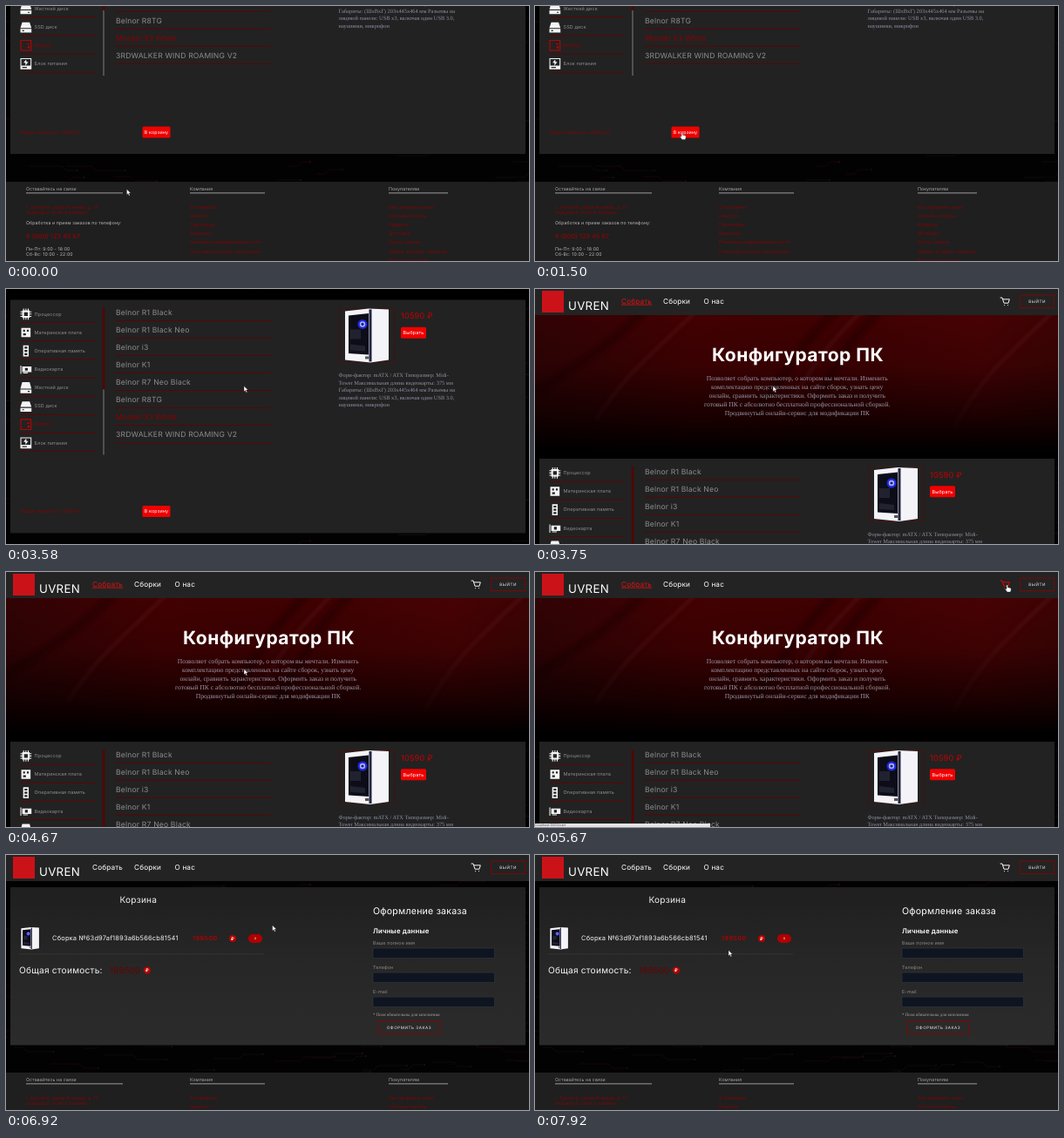
These frames come from a looping animation (600x293 px, 8000 ms). An HTML page:

```html
<!DOCTYPE html>
<html lang="ru">
<head>
<meta charset="utf-8">
<title>Конфигуратор ПК</title>
<style>
html, body { margin: 0; height: 100%; overflow: hidden; background: #000; }
svg { display: block; width: 100vw; height: 100vh; }
text { font-family: Inter, sans-serif; text-rendering: geometricPrecision; white-space: pre; }
.serif { font-family: "Liberation Serif", serif; }
</style>
</head>
<body>
<svg id="stage" viewBox="0 0 600 293"></svg>
<script>
const LOOP = 8000, FPS = 12;
const RED = '#e60000', DEEP = '#8c0000', LINE = '#640000', PANEL = '#222';

// Drawing helpers: y of a text is the middle of its lower-case letters
const text = (x, y, s, size, fill, extra = '') =>
  `<text x="${x}" y="${y + size * .33}" font-size="${size}" letter-spacing="${size * .02}" fill="${fill}" ${extra}>${s}</text>`;
const serif = (x, y, s, size, fill, extra = '') =>
  `<text class="serif" x="${x}" y="${y + size * .3}" font-size="${size}" fill="${fill}" ${extra}>${s}</text>`;
const rect = (x, y, w, h, fill, extra = '') =>
  `<rect x="${x}" y="${y}" width="${w}" height="${h}" fill="${fill}" ${extra}/>`;
const path = (d, fill, extra = '') => `<path d="${d}" fill="${fill}" ${extra}/>`;
const circle = (x, y, r, fill) => `<circle cx="${x}" cy="${y}" r="${r}" fill="${fill}"/>`;
const at = (x, y, body, scale = 1) => `<g transform="translate(${x} ${y}) scale(${scale})">${body}</g>`;
const middle = 'text-anchor="middle"';
const outline = (x, y, w, h, label) => rect(x, y, w, h, 'none', `stroke="#8e0000" stroke-width=".8"`) +
  text(x + w / 2, y + h / 2, label, 4.6, '#eee', `${middle} style="letter-spacing:.55px"`);
const button = (x, y, w, h, label, size) => rect(x, y, w, h, '#f00000', 'rx="1.5"') +
  text(x + w / 2, y + h / 2, label, size, '#fff', middle);
const rouble = (x, y) => circle(x, y, 4, '#b80000') + text(x, y, '₽', 5, '#fff', `${middle} font-weight="700"`);

// Faint circuit-board traces
function circuit(height) {
  let seed = 7, out = '';
  const rnd = n => (seed = seed * 16807 % 2147483647) % n;
  for (let i = 0; i < 150; i++) {
    const x = rnd(620) - 20, y = rnd(height), a = 8 + rnd(30), k = rnd(2) ? 5 : -5, b = 8 + rnd(30);
    out += path(`M${x} ${y}h${a}l5 ${k}h${b}`, 'none', `stroke="${i % 3 ? '#131010' : '#220709'}" stroke-width=".7"`) +
      circle(x + a + b + 5, y + k, 1, i % 5 ? '#141212' : '#33080a');
  }
  return rect(0, 0, 600, height, '#020202') + out;
}

function header(active) {
  const nav = [[99, 'Собрать'], [147, 'Сборки'], [193.5, 'О нас']];
  return rect(0, 0, 600, 30, '#232323') + rect(8, 2, 25, 25, '#cc1219') +
    text(38, 19.2, 'UVREN', 13.3, '#fff') +
    nav.map(([x, s], i) => text(x, 14, s, 8.2, i === active ? '#e01010' : '#fff',
      i === active ? 'text-decoration="underline"' : '')).join('') +
    path('M534 10h2l2 6.2h5l1.3-4.4h-7.5M538.5 18.6h.1M542.5 18.6h.1', 'none',
      'stroke="var(--trolley)" stroke-linecap="round" stroke-linejoin="round"') +
    outline(556.5, 7, 39.2, 14.5, 'ВЫЙТИ');
}

function hero() {
  const cables = [[0, 120, 130], [70, 150, 190], [255, 140, 350], [280, 150, 380], [310, 150, 400], [480, 160, 600]];
  return rect(0, 30, 600, 165, 'url(#heroBase)') +
    '<g filter="url(#soft)">' + cables.map(([x, y, end], i) =>
      path(`M${x} ${y}C${x + 40} 90 ${end - 60} 80 ${end} 20`, 'none',
        `stroke="${i % 2 ? '#6e2426' : '#120102'}" stroke-width="${i % 2 ? 5 : 9}" opacity=".35"`)).join('') + '</g>' +
    rect(0, 30, 600, 166, 'url(#heroShade)') +
    text(301.5, 76, 'Конфигуратор ПК', 21.1, '#fff', `${middle} font-weight="700"`) +
    ['Позволяет собрать компьютер, о котором вы мечтали. Изменить',
     'комплектацию представленных на сайте сборок, узнать цену',
     'онлайн, сравнить характеристики. Оформить заказ и получить',
     'готовый ПК с абсолютно бесплатной профессиональной сборкой.',
     'Продвинутый онлайн-сервис для модификации ПК']
      .map((s, i) => serif(300.7, 103 + i * 10, s, 7.62, '#9a98a8', middle)).join('');
}

const tower = path('M1 3L28 0L51 1V59L30 62L1 59Z', '#f4f4f8') + path('M5 8L28 5.5V53L5 51.5Z', '#0c0d18') +
  path('M28.5 1L31.5 1V61H28.5Z', '#23263f') +
  path('M7 24h12v11H7zM7 41l17 2v6L7 48z', '#20222f') +
  circle(21, 18, 5.5, '#2028e0') + circle(21, 18, 3.2, '#aab0ff') + circle(21, 18, 1.6, '#1a1d80') +
  rect(24, 55, 4.5, 3, '#555');

// Part icons on a 12 x 12 grid
const icons = [
  'M2 2h8v8H2zM4 4v4h4V4zM3 0h1v2H3zM5.5 0h1v2h-1zM8 0h1v2H8zM3 10h1v2H3zM5.5 10h1v2h-1zM8 10h1v2H8zM0 3h2v1H0zM0 5.5h2v1H0zM0 8h2v1H0zM10 3h2v1h-2zM10 5.5h2v1h-2zM10 8h2v1h-2z',
  'M1 1h10v10H1zM3 3v2h2V3zM7 3v2h2V3zM3 7v2h3V7z',
  'M3 0h6v12H3zM4.5 1.5v2h3v-2zM4.5 5v2h3V5zM4.5 8.5v2h3v-2z',
  'M0 2h1v9H0zM2 3h10v6H2zM5 4.5v3h3v-3zM3 9.5h5v1H3z',
  'M2 0h8l2 7H0zM0 8h12v4H0zM8 9.5v1h2v-1z',
  'M2 1h8l2 6H0zM0 8h12v4H0zM2 9.5v1h2v-1z',
  'M0 0h12v12H0zM1 1v10h10V1zM7 4h3v1H7zM8 7h2v2H8z',
  'M0 0h12v12H0zM1 1v7h10V1zM2 9.5v1h5v-1zM5.5 2h1v2h2l-3 4V5h-2z'];
const parts = ['Процессор', 'Материнская плата', 'Оперативная память', 'Видеокарта',
  'Жесткий диск', 'SSD диск', 'Корпус', 'Блок питания'];
const cases = ['Belnor R1 Black', 'Belnor R1 Black Neo', 'Belnor i3', 'Belnor K1',
  'Belnor R7 Neo Black', 'Belnor R8TG', 'Mordel X3 White', '3RDWALKER WIND ROAMING V2'];

function configurator() {
  const partList = parts.map((s, i) => {
    const y = 211.3 + i * 21.15, chosen = i === 6;
    return at(16.5, y - 6.3, path(icons[i], chosen ? '#c00000' : '#f4f4f4', 'fill-rule="evenodd"'), 1.06) +
      text(32.5, y, s, 5.5, chosen ? DEEP : '#8c8c8c') + rect(17, y + 9.4, 86, .8, LINE);
  }).join('');
  const caseList = cases.map((s, i) => {
    const y = 210.2 + i * 20;
    return text(126, y, s, 8.6, i === 6 ? DEEP : '#8c8c8c') + rect(126, y + 8.6, 178, .8, LINE);
  }).join('');
  const details = ['Форм-фактор: mATX / ATX Типоразмер: Midi-', 'Tower Максимальная длина видеокарты: 375 мм',
    'Габариты: (ШхВхГ) 203x445x464 мм Разъемы на', 'лицевой панели: USB x3, включая один USB 3.0,', 'наушники, микрофон'];
  return rect(5, 195, 591, 268, PANEL) + partList + caseList +
    rect(110.8, 204, 2.4, 94, '#560000') + rect(111, 298, 2, 75, '#505050') +
    rect(383, 205.5, 63, 61, 'none', 'stroke="#5a0808" stroke-width=".6"') + at(388, 205, tower) +
    text(453, 214, '10590 ₽', 9.2, '#c40000') + button(453, 226.3, 29, 13, 'Выбрать', 5.5) +
    details.map((s, i) => serif(381.5, 282 + i * 8.4, s, 6.4, '#8f8fa6')).join('') +
    text(16, 438, 'Общая стоимость: 199500 ₽', 4.9, DEEP) + button(156.5, 431.5, 32, 13, 'В корзину', 5.4);
}

function footer(top) {
  const column = (x, width, title, items) => text(x, top + 8.7, title, 5.2, '#aaa') + rect(x, top + 12.5, width, .8, '#bbb') +
    items.map((s, i) => text(x, top + 29 + i * 10.2, s, 5.1, DEEP)).join('');
  return rect(0, top, 600, 95, '#1f1f1f') +
    column(23, 111, 'Оставайтесь на связи', []) +
    text(23, top + 29, 'г. Луговой, улица Ясенева, д. 12', 5.1, DEEP) +
    text(23, top + 35, 'подъезд 2, этаж 3, кабинет', 5.1, DEEP) +
    text(23, top + 47, 'Обработка и прием заказов по телефону:', 5.2, '#bbb') +
    text(23, top + 63, '8 (000) 123 45 67', 7.1, '#a00000') +
    text(23, top + 77, 'Пн-Пт: 9:00 - 18:00', 5.2, '#bbb') + text(23, top + 83.3, 'Сб-Вс: 10:00 - 22:00', 5.2, '#bbb') +
    column(211, 86, 'Компания', ['О компании', 'Новости', 'Партнёрам', 'Вакансии',
      'Политика конфиденциальности', 'Пользовательское соглашение']) +
    column(439, 68, 'Покупателям', ['Как оформить заказ', 'Способы оплаты', 'Кредиты', 'Доставка',
      'Статус заказа', 'Обмен, возврат, гарантия', 'Вопросы и ответы']);
}

function basket() {
  const fields = ['Ваше полное имя', 'Телефон', 'E-mail'].map((s, i) =>
    text(421, 101 + i * 28, s, 5.4, '#8a8a8a') +
    rect(421, 107 + i * 28, 139.5, 11.5, '#0f1520', 'stroke="#30343c" stroke-width=".7"')).join('');
  const row = at(17, 83, tower, .41) + text(53, 96, 'Сборка №63d97af1893a6b566cb81541', 7.5, '#f2f2f2') +
    text(214, 96, '199500', 7.1, '#b00000', 'font-weight="600" style="letter-spacing:.5px"') + rouble(260, 96) +
    rect(278, 91, 16, 10, '#b00000', 'rx="5"') + text(286, 96, 'x', 4.5, '#fff', middle) +
    rect(15, 113.5, 281, .7, '#3c3c3c');
  const total = (y, sum, x) => text(15, y, 'Общая стоимость:', 10.2, '#f2f2f2') +
    text(119, y, sum, 9.8, '#6a0000') + rouble(x, y - .3);
  return rect(5, 37, 591, 181.5, 'url(#basketPanel)') + text(130.5, 52, 'Корзина', 10.1, '#f2f2f2') +
    `<g id="empty">${total(89.7, '0', 133)}</g><g id="filled">${row + total(132.7, '199500', 162)}</g>` +
    text(421, 64.3, 'Оформление заказа', 10.6, '#fff') +
    text(421, 87, 'Личные данные', 7.8, '#fff', 'font-weight="600"') + fields +
    serif(421, 183.7, '* Поля обязательны для заполнения', 5, '#aaa') + outline(427, 190.5, 71, 15, 'ОФОРМИТЬ ЗАКАЗ');
}

const stops = list => list.map(([o, c, a = 1]) => `<stop offset="${o}" stop-color="${c}" stop-opacity="${a}"/>`).join('');
const stage = document.getElementById('stage');
stage.innerHTML = `<defs>
  <linearGradient id="heroBase">${stops([[0, '#380406'], [.3, '#4c0203'], [.6, '#480203'], [.85, '#520305'], [1, '#460405']])}</linearGradient>
  <linearGradient id="heroShade" x2="0" y2="1">${stops([[0, '#000', .12], [.35, '#000', .25], [.7, '#000', .65], [.95, '#000']])}</linearGradient>
  <linearGradient id="basketPanel" x2="0" y2="1">${stops([[0, '#1f1f1f'], [.5, '#272727'], [1, '#2b2b2b']])}</linearGradient>
  <filter id="soft"><feGaussianBlur stdDeviation="2"/></filter></defs>
  <g id="build">${circuit(590) + hero() + header(0) + configurator() + footer(495)}</g>
  <g id="cart">${circuit(293) + header(-1) + basket() + footer(250)}</g>
  <g id="status">${rect(0, 289, 201, 4, '#e4e4e4') + text(.5, 291, 'localhost:3000/cart', 3.6, '#444')}</g>
  <g id="pointer">
    ${path('M0 0V6.4L1.5 5L2.6 7.4L3.7 6.9L2.6 4.6H4.6Z', '#fff', 'id="arrow" stroke="#222" stroke-width=".4"')}
    ${path('M0 .7Q.8-.3 1.5.7V3.2L5 4Q5.6 6 4.4 8.5H.7L-1.6 5.2Q-1.4 4.2 0 5Z', '#fff', 'id="hand" stroke="#222" stroke-width=".4"')}
  </g>`;

const part = id => document.getElementById(id);
const show = (id, on) => part(id).setAttribute('visibility', on ? 'visible' : 'hidden');
const move = (id, x, y) => part(id).setAttribute('transform', `translate(${x} ${y})`);

// Each key is [time, ...values]
function track(keys, t, ease = u => u) {
  const i = keys.findIndex(k => k[0] > t);
  if (i < 0) return keys.at(-1).slice(1);
  if (i === 0) return keys[0].slice(1);
  const a = keys[i - 1], b = keys[i], u = ease((t - a[0]) / (b[0] - a[0]));
  return a.slice(1).map((v, n) => v + (b[n + 1] - v) * u);
}
const smooth = u => u * u * (3 - 2 * u);
const scrollKeys = [[3417, 293], [3500, 258], [3583, 183], [3667, 70], [3750, 0]];
const pointerKeys = [[0, 138.5, 210.5], [830, 168, 145], [2330, 168, 145], [2750, 273, 111.5], [5170, 273, 111.5],
  [5583, 541, 14.5], [5917, 541, 14.5], [6333, 308.5, 79.5], [6830, 308.5, 79.5], [7583, 230, 113],
  [7917, 222, 109.5]];

function frame(now) {
  const t = Math.floor((now % LOOP + 4) * FPS / 1000) * 1000 / FPS;
  const [x, y] = track(pointerKeys, t, smooth);
  const inCart = t >= 5830, loaded = t >= 6490, hover = t >= 5490 && t < 6830;
  const linked = t >= 740 && t < 2410 || t >= 5490 && t < 5990;
  move('build', 0, -track(scrollKeys, t)[0]);
  move('pointer', x, y);
  show('build', !inCart);
  show('cart', inCart);
  show('empty', inCart && !loaded);
  show('filled', inCart && loaded);
  show('status', hover);
  show('arrow', !linked);
  show('hand', linked);
  stage.style.setProperty('--trolley', hover ? RED : '#f4f4f4');
  requestAnimationFrame(frame);
}
requestAnimationFrame(frame);
</script>
</body>
</html>
```
